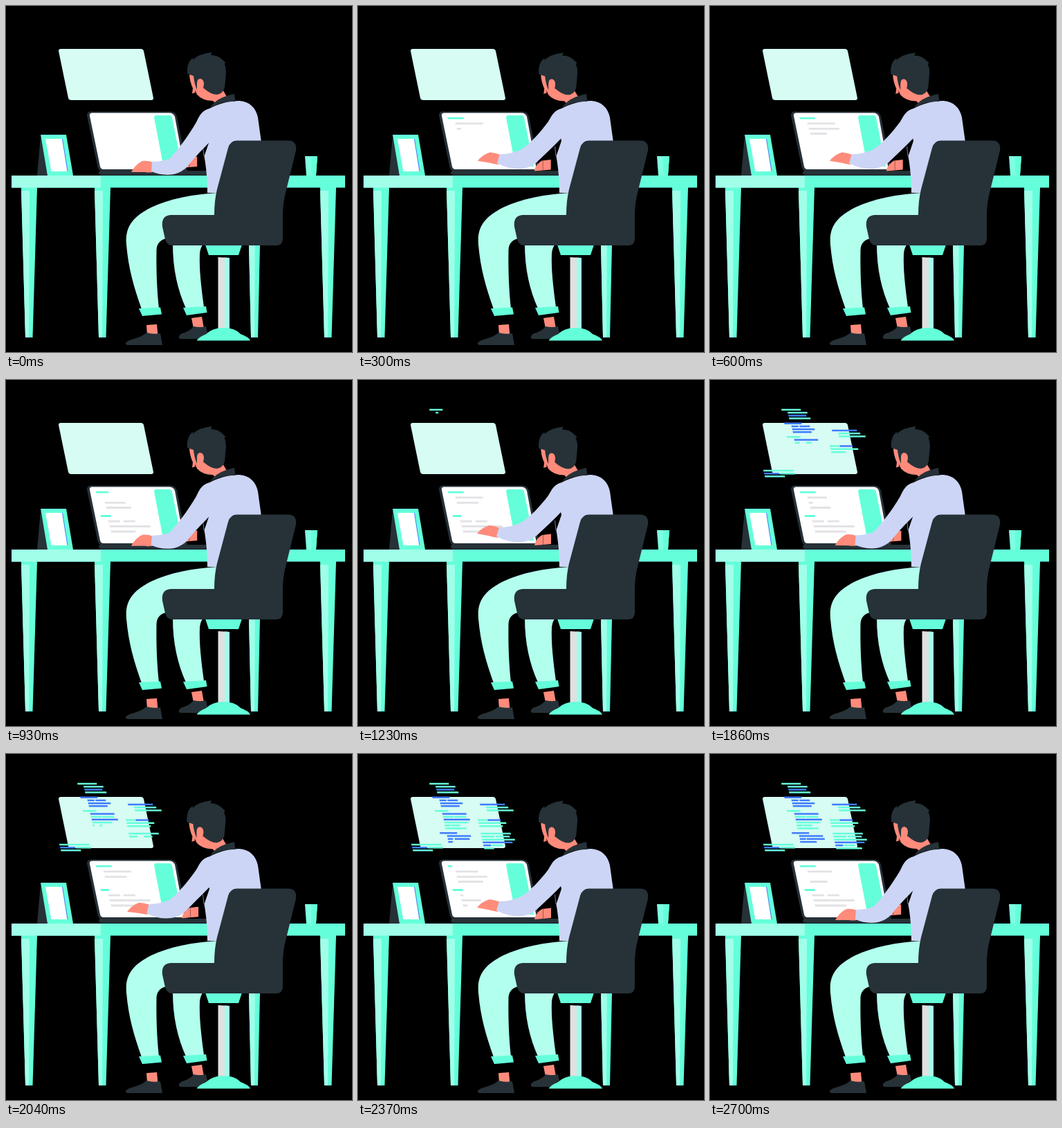
Write an HTML page that moves like this. It is 500x500 px and loops after 2730 ms.

```html
<!DOCTYPE html>
<html lang="en">
<head>
<meta charset="utf-8">
<title>At the desk</title>
<style>
  html, body { margin: 0; width: 100%; height: 100%; overflow: hidden; background: #000; }
  svg { display: block; width: 100%; height: 100%; }
  .teal { fill: #64ffda; }
  .mint { fill: #a1ffe9; }
  .pants { fill: #b2ffee; }
  .dark { fill: #263238; }
  .skin { fill: #ff8b7b; }
  .shirt { fill: #ccd5f5; }
  .blue { fill: #407bff; }
  .grey { fill: #e2e2e6; }
  .white { fill: #fff; }
</style>
</head>
<body>
<svg viewBox="0 0 500 500">
  <rect width="500" height="500"/>

  <!-- floating panel -->
  <path fill="#d6fcf3" d="M79 62H195Q198 62 199 65L213 133Q213 136 210 136H94Q91 136 90 133L76 65Q76 62 79 62Z"/>
  <g id="code"></g>

  <!-- desk -->
  <g id="legs"></g>
  <path class="teal" d="M350 300H368L364 479H354Z"/>
  <path class="mint" d="M350 300H360L359 479H354Z"/>
  <path class="teal" d="M8 245H490V262.500H8Z"/>
  <path class="mint" d="M8 245H137V262.500H8Z"/>

  <!-- photo frame and cup -->
  <path class="dark" d="M50 188L45 245H61Z"/>
  <path class="teal" d="M50 186H87L97 245H60Z"/>
  <path class="blue" d="M58 192H82L89.500 239H66Z"/>
  <path class="white" d="M57 192H81L88.500 239H65.500Z"/>
  <path fill="#7dffe1" d="M432 217H450L448 245H434Z"/>
  <path class="teal" d="M441 217H450L448 245H441Z"/>

  <!-- laptop -->
  <path class="dark" d="M122 152.500H238Q245 153 247 160L262 238H290V244.500H138Q134 244 134 240L136 238Q133 236 132 230L117 158Q117 153 122 152.500Z"/>
  <path class="white" d="M124 154.500H237Q242 155 244 160L258 236H141Q137 236 136 232L121 159Q120 155 124 154.500Z"/>
  <path class="teal" d="M217 158H236Q239 158 240 161L254 232H231Q228 232 227 229L214 161Q214 158 217 158Z"/>
  <g id="screen"></g>

  <!-- far hand -->
  <g id="far">
    <path class="skin" d="M255 239Q257 229 266 224L279 222.500V237Z"/>
    <path d="M267.500 224V238" stroke="#7a3f3a" stroke-width=".7"/>
  </g>
  <path d="M284.500 203L286 217" stroke="#aab2d0" stroke-width=".7"/>

  <!-- legs and shoes -->
  <path class="pants" d="M241 344C241 380 248 410 260 437L286 435C282 405 279 380 280 357Q281 349 285 344Z"/>
  <path class="pants" d="M306 270C270 272 235 279 210 291C180 306 172 322 174 345C177 380 185 407 196 438L221 437C218 410 217 380 217.500 352C218 343 224 337 232 336L306 330Z"/>
  <path class="teal" d="M256 436L289 434L290.500 443L261 447Z"/>
  <path class="teal" d="M192 437L223 435.500L225 445.500L197 448Z"/>
  <path class="skin" d="M268 451L283 449L286 466H271Z"/>
  <path class="skin" d="M203 461L218 460L219.500 476H204Z"/>
  <path class="dark" d="M250 478Q250 474 258 472Q268 468 271 463Q280 465 289 463L291 472L277 481H253Q249 481 250 478Z"/>
  <path class="dark" d="M173 487Q174 484 185 481Q198 477 203 472Q213 475 223 473L226 490H176Q173 490 173 487Z"/>

  <!-- chair stem -->
  <path class="teal" d="M288 345H341L336 360H293Z"/>
  <path fill="#e0e0e0" d="M306.500 363L323 364V470H306.500Z"/>
  <path class="mint" d="M316 363.500L323 364V470H316Z"/>
  <path class="teal" d="M276 483.500Q276 480 289 474Q299 465 314 465Q331 465 339 474Q352 479 353 483.500Z"/>

  <!-- head -->
  <g id="head">
    <path class="skin" d="M265 97L278 98L312 119L319 131L303 141L299 137Q284 137 276 128L273 121L273.500 125L269 126.500L270 119Q265 108 265 97Z"/>
    <path class="dark" d="M262 98C261 86 265 77 271 75L270 78Q278 69 297.500 67L296 71Q306 71 312 77L317.500 82L315.500 83Q318 89 318 96L316 118Q313 127 305 128Q296 128 286 119L276 121Q272 112 271 101Z"/>
    <path class="skin" d="M276 112Q276 105 281 105Q286 106 286 113L285 119Q290 123 289 128L276 126Z"/>
  </g>

  <!-- body -->
  <path class="shirt" d="M285 154C300 143 319 137 337 137C352 138 361 147 364 161L369 197L345 270H291C291 248 289 232 286.500 217L294 195Z"/>
  <path class="dark" d="M295 147Q304 132 330 127L331.500 138Q312 137 295 147Z"/>
  <path class="skin" id="hand"/>
  <path class="shirt" id="arm"/>

  <!-- chair -->
  <path class="dark" d="M333 194.500H408Q421 195 419 209L403 274Q400.500 285 400 300V336Q400 346 390 346H241Q232 346 230 337L226 319Q224 303 238 302H301Q301 281 305 265L321 205Q324 195 333 194.500Z"/>
</svg>

<script>
const LOOP = 2730, STEP = 30, TYPE_CYCLE = 810, SWING = 900;
const $ = id => document.getElementById(id);
const clamp = v => Math.max(0, Math.min(1, v));

function add(parent, cls, d = '') {
  const el = document.createElementNS('http://www.w3.org/2000/svg', 'path');
  el.setAttribute('class', cls);
  el.setAttribute('d', d);
  parent.append(el);
  return el;
}

for (const x of [22, 128, 454]) {
  add($('legs'), 'teal', `M${x} 262h23l-6.500 217h-10.500z`);
  add($('legs'), 'mint', `M${x} 267h12l-1 212h-5z`);
}

// Slanted bar that can grow from its left end
const bar = (x, y, w, h) => w < .3 ? '' : `M${x} ${y}h${w}l${h * .2} ${h}h${-w}z`;

// Screen text: class, x, y, width, delay, typing time
const rows = [
  ['teal', 129.5, 160.8, 23, 0, 150],
  ['grey', 140.5, 168.4, 40, 120, 170],
  ['grey', 142.5, 175.9, 44, 270, 210],
  ['grey', 144.5, 183.1, 36, 420, 270],
  ['teal', 136.5, 195.1, 15, 600, 150],
  ['grey', 147.5, 202.7, 17, 720, 120],
  ['grey', 169.5, 202.7, 17, 750, 180],
  ['grey', 149.5, 210.1, 59, 660, 190],
  ['grey', 151.5, 217.6, 45, 780, 190]
].map(([cls, x, y, w, delay, grow]) => ({ el: add($('screen'), cls), x, y, w, delay, grow }));

function typed(t, { delay, grow }) {
  if (t < delay) return 0;
  const u = (t - delay) % TYPE_CYCLE;
  return Math.min(clamp(u / grow), clamp((TYPE_CYCLE - u) / 220));
}

// Code blocks: each line is y followed by parts of [colour, x, width]
const T = 'teal', B = 'blue';
const blocks = [
  { start: 1148, gap: 66, time: 120, lines: [
    [41.8, [T, 103, 28]], [46, [T, 112, 28.5]], [50.2, [B, 113, 26]], [54.3, [T, 114, 31]],
    [61.5, [B, 107, 25]], [65.7, [B, 117.5, 10], [B, 129, 15]], [69.9, [B, 118.5, 32.5]],
    [74.1, [B, 119.5, 27]], [81, [T, 111, 19.5]], [85.2, [B, 121.5, 35]],
    [89.4, [T, 122.5, 15.5], [T, 139, 17]], [93.6, [B, 123.5, 38]], [97.8, [T, 124.5, 34.5]],
    [102, [T, 125, 9], [T, 135, 12.5]], [106.2, [T, 126, 30.5]], [113, [B, 118, 25]],
    [117.3, [B, 128.5, 34.5]], [121.5, [B, 129.5, 9], [B, 139.5, 26]], [125.7, [B, 130, 24]]
  ] },
  { start: 1330, gap: 90, time: 130, lines: [
    [71.8, [B, 176, 36]], [76, [T, 185, 32]], [80.3, [T, 186, 38.5]],
    [94.3, [T, 173, 13], [B, 187, 19]], [98.6, [T, 174, 40]], [102.9, [T, 175, 34]],
    [113.8, [T, 177, 43.5]], [118.1, [T, 178, 19], [T, 199, 20]], [122.4, [T, 179, 47.5]],
    [126.6, [B, 180, 43]], [130.8, [B, 181, 11], [T, 193, 16.5]], [135, [T, 182, 37.5]]
  ] },
  { start: 1330, gap: 90, time: 130, lines: [
    [129.7, [T, 77, 43.5]], [133.9, [B, 78, 22], [T, 101, 21.5]], [138.1, [T, 79, 29]]
  ] }
];
const bits = blocks.flatMap(b => b.lines.flatMap(([y, ...parts], i) =>
  parts.map(([cls, x, w]) => ({
    el: add($('code'), cls), x, y, w, at: b.start + b.gap * i, time: b.time
  }))));

// Two poses per limb, blended number by number
const blend = (a, b, k) => {
  const to = b.match(/[\d.]+/g);
  let i = 0;
  return a.replace(/[\d.]+/g, n => +n + (to[i++] - n) * k);
};
const hand = [
  'M181 240Q187 229 197 224Q204 223 213 226L212 240Q206 241 201 240Z',
  'M172 222Q179 213 190 210Q198 211 206 214L202 228Q195 227 188 225Z'
];
const arm = [
  'M297 148C283 149 279 160 275 168C262 190 249 207 236 221Q224 225 211 225L210 239Q226 246 243 243Q255 240 263 231C275 216 285 206 296 195L310 165Z',
  'M297 148C283 149 279 161 275 167C262 184 250 196 239 204Q224 213 204 213L200 226Q219 236 237 234Q249 233 258 225C272 212 284 201 296 188L310 165Z'
];

function draw(t) {
  const swing = (1 - Math.cos(2 * Math.PI * t / SWING)) / 2;
  const k = swing / .835;
  $('hand').setAttribute('d', blend(...hand, k));
  $('arm').setAttribute('d', blend(...arm, k));
  $('far').setAttribute('transform', `translate(${-2.8 * (1 - k)} ${-5 * (1 - k)})`);
  $('head').setAttribute('transform', `translate(${-swing} ${swing * .6})`);
  for (const r of rows) r.el.setAttribute('d', bar(r.x, r.y, r.w * typed(t, r), 2.8));
  for (const c of bits) c.el.setAttribute('d', bar(c.x, c.y, c.w * clamp((t - c.at) / c.time), 2.5));
}

let begin;
function tick(now) {
  begin ??= now;
  draw(Math.floor((now - begin) % LOOP / STEP) * STEP);
  requestAnimationFrame(tick);
}
draw(0);
requestAnimationFrame(tick);
</script>
</body>
</html>
```
